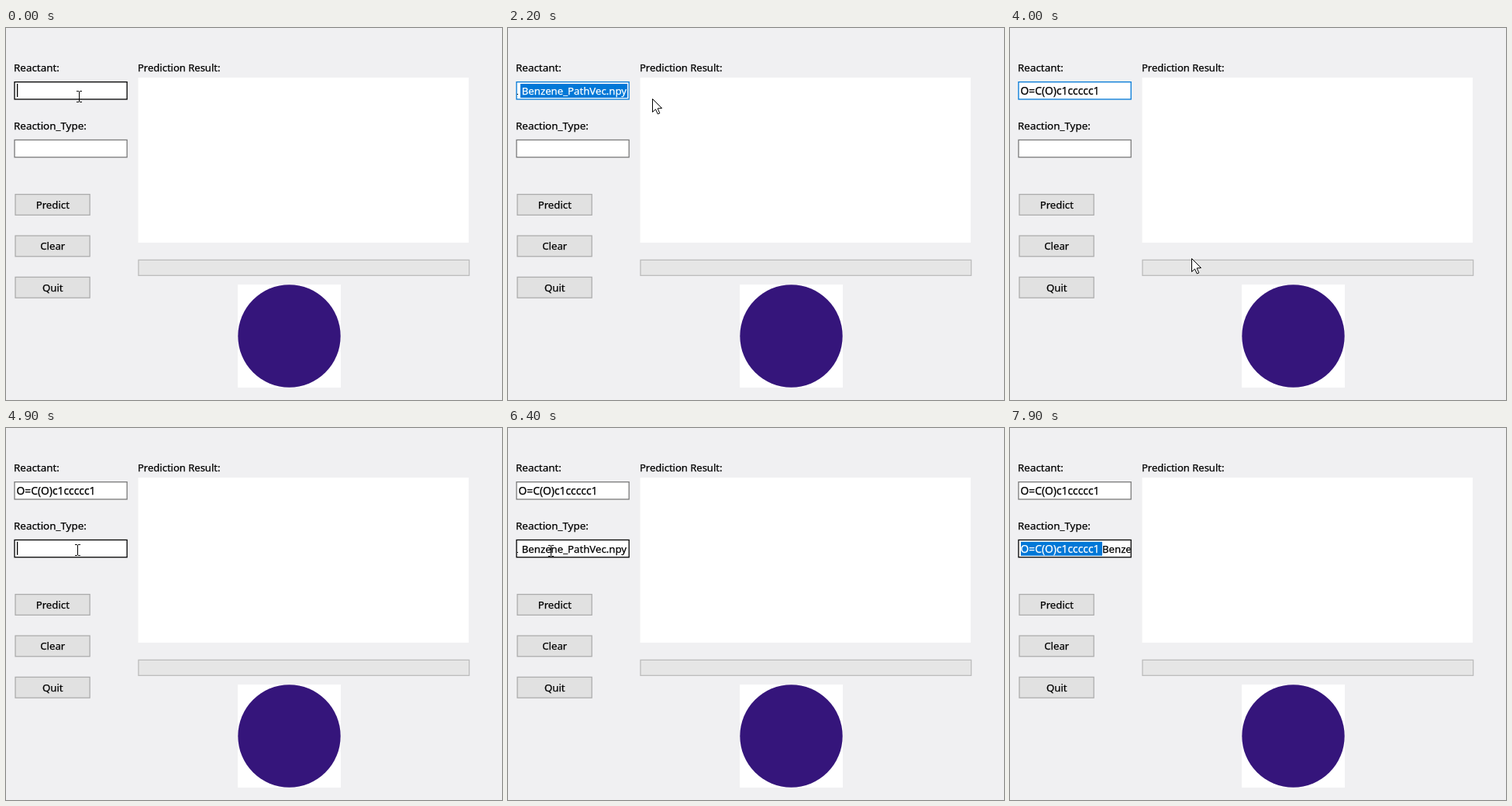
These frames come from a looping animation (640x480 px, 8000 ms). An HTML page with a canvas:

```html
<!DOCTYPE html>
<html lang="en">
<head>
<meta charset="utf-8">
<title>Reaction predictor</title>
<style>
  html, body { margin: 0; width: 100%; height: 100%; overflow: hidden; background: #f0f0f2; }
  canvas { display: block; }
</style>
</head>
<body>
<canvas id="stage" width="640" height="480"></canvas>
<script>
const ctx = document.getElementById('stage').getContext('2d');
const LOOP = 8000, STEP = 100, BLINK = 530;
const FORMULA = 'O=C(O)c1ccccc1', FILE = 'Benzene_PathVec.npy';
const BLUE = '#0078d7', GREY = '#7a7a7a', INK = '#000';
const EDGE = 1.3;

// Moments of the session, in ms
const PASTE = 500, DRAG = 1700, CUT = 2950, FOCUS = 4900, PASTE2 = 5500, HOME = 7600;

// Pointer path: time, x, y
const PATH = [
  [0, 94, 88], [600, 94, 88], [1300, 40, 101], [1600, 17, 83], [1700, 17, 83],
  [2300, 200, 92], [3000, 283, 107], [4000, 234, 297], [4800, 92, 157],
  [5300, 90, 157], [5800, 60, 158], [6400, 55, 158], [7000, 32, 168],
  [7300, 18, 157], [7400, 18, 157], [7800, -20, 160], [8000, -20, 160]
];

function pointer(t) {
  const i = Math.max(1, PATH.findIndex(k => k[0] > t));
  const [t0, x0, y0] = PATH[i - 1], [t1, x1, y1] = PATH[i];
  const u = (t - t0) / (t1 - t0), e = u * u * (3 - 2 * u);
  return { x: Math.round(x0 + (x1 - x0) * e), y: Math.round(y0 + (y1 - y0) * e) };
}

function rect(x, y, w, h, color) {
  ctx.fillStyle = color;
  ctx.fillRect(x, y, w, h);
}

function box(x, y, w, h, fill, edge) {
  rect(x, y, w, h, edge);
  rect(x + EDGE, y + EDGE, w - 2 * EDGE, h - 2 * EDGE, fill);
}

// A hairline stroke gives the text its slightly heavy weight
function text(str, x, y, { size = 13, color = INK, align = 'left' } = {}) {
  ctx.font = `${size}px "Noto Sans", "Open Sans", sans-serif`;
  ctx.textAlign = align;
  ctx.fillStyle = ctx.strokeStyle = color;
  ctx.lineWidth = 0.25;
  ctx.fillText(str, x, y);
  ctx.strokeText(str, x, y);
}

const formula = (y, color) => text(FORMULA, 13.5, y, { size: 13.8, color });
const tail = (y, color) => text(FILE, 153, y, { size: 13.2, color, align: 'right' });

const blinkOn = (t, since) => t >= since && (t - since) % (2 * BLINK) < BLINK;

// One line edit; mode is '', 'formula', 'tail' (scrolled to the end) or 'home'
function field(y, { edge, mode, caret, select = 0 }) {
  box(10.4, y, 146.4, 23.6, '#fff', edge);
  ctx.save();
  ctx.beginPath();
  ctx.rect(11.7, y + 1, 143.8, 22);
  ctx.clip();
  const base = Math.round(y) + 17;
  if (mode === 'formula') formula(base);
  if (mode === 'tail') {
    rect(11, base - 1, 2, 1, INK);
    tail(base);
    if (select > 16) {
      ctx.beginPath();
      ctx.rect(16, y + 3, select - 16, 18);
      ctx.clip();
      rect(16, y + 3, select - 16, 18, BLUE);
      tail(base, '#fff');
    }
  }
  if (mode === 'home') {
    rect(14, y + 3, 105, 18, BLUE);
    formula(base, '#fff');
    text(FILE, 119, base, { size: 13.2 });
  }
  if (caret) {
    const x = { '': 14, formula: 115, tail: 153 }[mode];
    rect(x, y + 3, EDGE, 17, INK);
  }
  ctx.restore();
}

function button(label, y) {
  box(11.4, y, 97.4, 28, '#e1e1e1', '#adadad');
  text(label, 60.3, y + 19, { size: 13.2, align: 'center' });
}

function beam(x, y) {
  rect(x, y - 6, 1, 13, INK);
  for (const end of [y - 7, y + 7]) {
    rect(x - 3, end, 3, 1, INK);
    rect(x + 1, end, 3, 1, INK);
  }
}

function arrow(x, y) {
  const pts = [[0, 0], [0, 17], [4, 13.4], [6.8, 19.5], [9.3, 18.4], [6.6, 12.4], [12, 12]];
  ctx.beginPath();
  for (const [dx, dy] of pts) ctx.lineTo(x + dx + 0.5, y + dy + 0.5);
  ctx.closePath();
  ctx.fillStyle = '#fff';
  ctx.fill();
  ctx.strokeStyle = INK;
  ctx.lineWidth = 1;
  ctx.stroke();
}

function panel() {
  rect(0, 0, 640, 480, '#f0f0f2');
  text('Reactant:', 10, 56, { size: 13.4 });
  text('Reaction_Type:', 10, 131, { size: 13.4 });
  text('Prediction Result:', 170, 56);
  rect(170.6, 64, 426.4, 213, '#fff');
  box(170.3, 298.7, 428, 21.3, '#e6e6e6', '#bcbcbc');
  button('Predict', 214);
  button('Clear', 267.4);
  button('Quit', 320.8);
  rect(299, 331, 133, 133, '#fff');
  ctx.beginPath();
  ctx.arc(365.5, 397.5, 66.2, 0, 2 * Math.PI);
  ctx.fillStyle = '#35157b';
  ctx.fill();
}

function draw(t) {
  const p = pointer(t), overField = p.x < 160 && p.y < 170;
  const focusEdge = overField ? INK : BLUE, second = t >= FOCUS;

  panel();
  const dragging = t >= DRAG && t < CUT;
  const caretFrom = t < PASTE ? 0 : t < CUT ? PASTE : CUT;
  field(69, {
    edge: second ? GREY : focusEdge,
    mode: t < PASTE ? '' : t < CUT ? 'tail' : 'formula',
    caret: !second && !dragging && blinkOn(t, caretFrom),
    select: dragging ? Math.min(p.x, 154) : 0
  });
  field(143.8, {
    edge: second ? focusEdge : GREY,
    mode: t < PASTE2 ? '' : t < HOME ? 'tail' : 'home',
    caret: second && t < 7400 && blinkOn(t, t < PASTE2 ? FOCUS : PASTE2)
  });
  (overField ? beam : arrow)(p.x, p.y);
}

const start = performance.now();
function tick() {
  const t = (performance.now() - start) % LOOP;
  draw(Math.floor(t / STEP) * STEP);
  requestAnimationFrame(tick);
}
tick();
</script>
</body>
</html>
```
